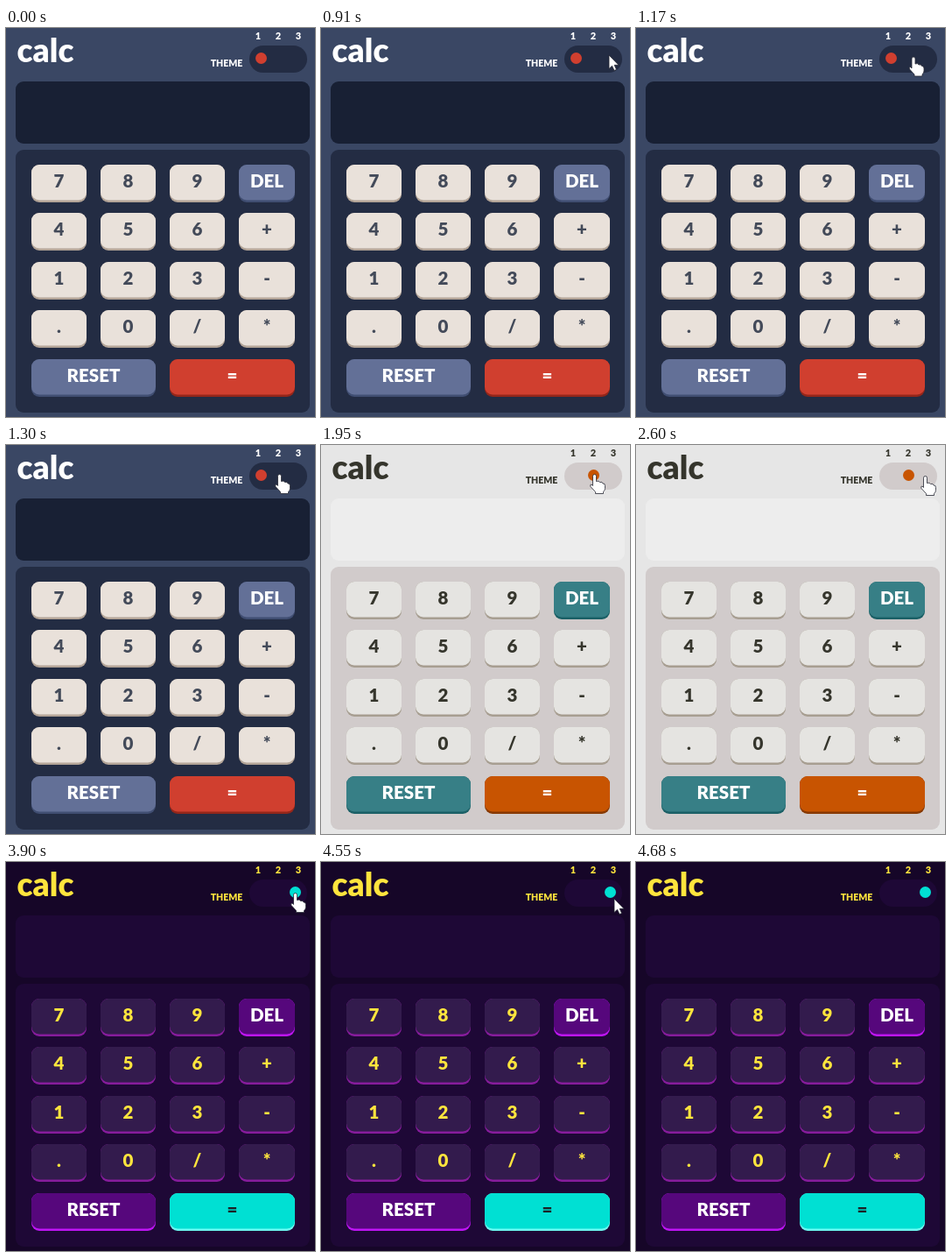
These frames come from a looping animation (353x444 px, 5.72 s). An HTML page:

```html
<!DOCTYPE html>
<html lang="en">
<head>
<meta charset="utf-8">
<title>calc</title>
<style>
  html, body { margin: 0; width: 100%; height: 100%; overflow: hidden; }
  svg { display: block; width: 353px; height: 444px; background: var(--bg); }
  text { font: 900 20.5px Lato, "Open Sans", sans-serif; text-anchor: middle; fill: var(--ink); }
  .head { fill: var(--head); }
  .small { font-size: 11px; }
  .panel { fill: var(--panel); }
  .screen { fill: var(--screen); }
  .num { fill: var(--num); }
  .num.edge { fill: var(--numEdge); }
  .fn { fill: var(--fn); }
  .fn.edge { fill: var(--fnEdge); }
  .eq { fill: var(--eq); }
  .eq.edge { fill: var(--eqEdge); }
  text.fn { fill: #fff; }
  text.eq { fill: var(--eqInk); }
  #dot { fill: var(--eq); }
  .cursor { fill: #fff; stroke: #252733; stroke-width: .8; stroke-linejoin: round; }

  .t1 { --bg: #3a4764; --panel: #232c43; --screen: #182034; --head: #fff; --ink: #434a59;
        --num: #e9e1da; --numEdge: #b3a497; --fn: #637097; --fnEdge: #404e72;
        --eq: #d03f2f; --eqEdge: #93261a; --eqInk: #fff; }
  .t2 { --bg: #e6e6e6; --panel: #d1cbcb; --screen: #ededed; --head: #35352c; --ink: #35352c;
        --num: #e5e4e1; --numEdge: #a79e91; --fn: #377f86; --fnEdge: #1b6066;
        --eq: #c85401; --eqEdge: #873901; --eqInk: #fff; }
  .t3 { --bg: #160628; --panel: #1e0836; --screen: #1e0836; --head: #ffe53d; --ink: #ffe53d;
        --num: #331b4d; --numEdge: #871c9c; --fn: #56077c; --fnEdge: #be15f4;
        --eq: #00e0d3; --eqEdge: #6cf9f1; --eqInk: #1a2327; }
</style>
</head>
<body>
<svg id="stage" class="t1" viewBox="0 0 353 444">
  <text class="head" x="45" y="39" style="font-size:37px">calc</text>
  <text class="head" x="252" y="44" style="font-size:10.5px">THEME</text>
  <text class="head small" x="288" y="13">1</text>
  <text class="head small" x="311" y="13">2</text>
  <text class="head small" x="334" y="13">3</text>
  <rect class="panel" x="278" y="20" width="66" height="31" rx="15.5"/>
  <circle id="dot" cy="34.5" r="6.5"/>
  <rect class="screen" x="11" y="61" width="336" height="71" rx="9"/>
  <rect class="panel" x="11" y="139" width="336" height="300" rx="9"/>
  <g id="keys"></g>
  <path id="arrow" class="cursor" d="M0 0V15.5L3.5 12.3 6 17.5 8.5 16.4 6.2 11.3H11Z"/>
  <path id="hand" class="cursor" d="M-2 2A2 2 0 0 1 2 2V8Q5 6.800 6 9 9 8 9.500 10.500 12 10 12 13V16Q12 18 10 20V22H1V20L-4.500 14Q-5.500 11.500-3.500 11.500L-2 13Z"/>
</svg>
<script>
  const $ = id => document.getElementById(id);
  const cols = [29, 108, 187, 266], rows = [156, 211, 267, 322, 378];

  function key(label, col, row, kind = "num", w = 63) {
    const x = cols[col], y = rows[row];
    const box = (cls, h) => `<rect class="${cls}" x="${x}" y="${y}" width="${w}" height="${h}" rx="9"/>`;
    return box(kind + " edge", 43) + box(kind, 40.5) +
      `<text class="${kind === "num" ? "" : kind}" x="${x + w / 2}" y="${y + 25.5}">${label}</text>`;
  }

  const grid = ["7", "8", "9", "DEL", "4", "5", "6", "+", "1", "2", "3", "-", ".", "0", "/", "*"];
  $("keys").innerHTML =
    grid.map((s, i) => key(s, i % 4, i >> 2, s === "DEL" ? "fn" : "num", i % 4 === 3 ? 64 : 63)).join("") +
    key("RESET", 0, 4, "fn", 142) + key("=", 2, 4, "eq", 143);

  // Pointer steps: start time, shape, hotspot x and y
  const steps = [
    [0], [910, "arrow", 329, 31], [1040, "hand", 324, 33], [1170, "hand", 317, 33],
    [1300, "hand", 312.5, 33.5], [2470, "hand", 322, 34.5], [2600, "hand", 330.5, 35.5],
    [4550, "arrow", 335, 42], [4680]
  ];
  const dotX = [291.5, 311.5, 330.5];

  function draw(now) {
    const t = now % 5720;
    const theme = t < 1950 ? 1 : t < 3900 ? 2 : 3;
    $("stage").setAttribute("class", "t" + theme);
    $("dot").setAttribute("cx", dotX[theme - 1]);
    const [, shape, x, y] = steps.findLast(s => s[0] <= t);
    for (const id of ["arrow", "hand"]) {
      $(id).style.display = id === shape ? "" : "none";
      if (id === shape) $(id).setAttribute("transform", `translate(${x} ${y})`);
    }
  }

  const start = performance.now();
  function tick() {
    draw(performance.now() - start);
    requestAnimationFrame(tick);
  }
  tick();
</script>
</body>
</html>
```
